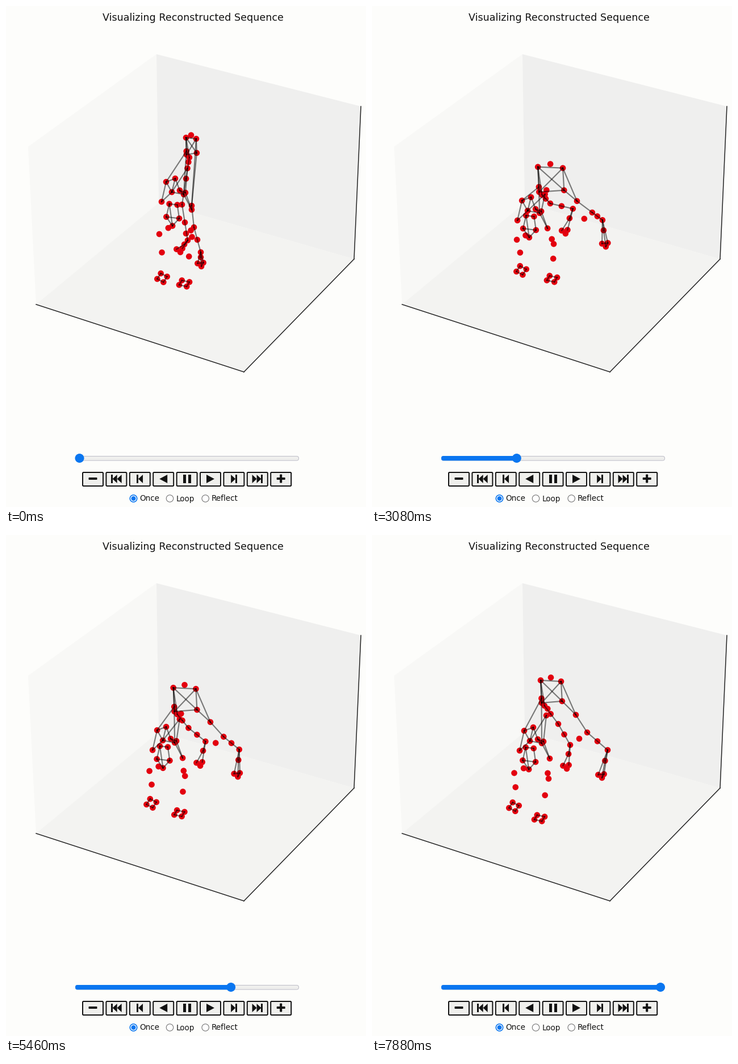
Write a matplotlib script that moves like this. It is 634 px wide and 883 px high and loops after 8350 ms.

```python
import numpy as np
import matplotlib.pyplot as plt
from matplotlib.animation import FuncAnimation
from matplotlib.collections import EllipseCollection, LineCollection
from matplotlib.patches import Circle, FancyBboxPatch, Polygon, Rectangle

W, H, DPI = 634, 883, 100
LOOP, STEP = 8350, 25
PX = 72 / DPI  # points per pixel

PAPER, INK, BLUE, RED = "#fdfdfb", "#121212", "#0a76f0", "#e3000f"

plt.rcParams["font.family"] = "DejaVu Sans"
fig = plt.figure(figsize=(W / DPI, H / DPI), dpi=DPI, facecolor=PAPER)
ax = fig.add_axes([0, 0, 1, 1])
ax.set_xlim(0, W)
ax.set_ylim(H, 0)
ax.axis("off")


# ---- fixed scenery -------------------------------------------------------

def poly(points, color, z=1):
    ax.add_patch(Polygon(points, closed=True, fc=color, ec="none", zorder=z))


def rect(x, y, w, h, color, z=3):
    ax.add_patch(Rectangle((x, y), w, h, fc=color, ec="none", zorder=z))


def pill(x, y, w, h, r, face, edge="none", lw=0.0, z=2):
    box = FancyBboxPatch((x, y), w, h, boxstyle=f"round,pad=0,rounding_size={r}",
                         fc=face, ec=edge, lw=lw * PX, zorder=z)
    ax.add_patch(box)
    return box


def label(x, y, text, size, ha="left"):
    ax.text(x, y, text, fontsize=size * PX, ha=ha, va="baseline", color=INK)


def draw_room():
    top, back = (265, 85), (269, 347)
    left, front, right = (53, 526), (419, 645), (613, 446)
    poly([(39, 248), top, back, left], "#f8f8f6")
    poly([top, (625, 177), right, back], "#efefee")
    poly([left, back, right, front], "#f3f3f1")
    for a, b in ((left, front), (front, right), (right, (625, 177))):
        ax.plot(*zip(a, b), color="#222222", lw=1.5 * PX, zorder=2)


def triangle(base, tip, y=833.5, half=7.5):
    poly([(base, y - half), (tip, y), (base, y + half)], INK, 3)


def skip(cx, way, count):
    """Bar with one or two triangles pointing towards it."""
    size = 8
    half = (count * size + 2.5) / 2
    for k in range(count):
        base = cx - way * (half - k * size)
        triangle(base, base + way * size)
    bar = cx + way * (half - 1.25)
    rect(bar - 1.5, 826, 3, 15, INK)


def draw_buttons():
    centres = [153 + 41.4 * k for k in range(9)]
    for cx in centres:
        pill(cx - 18, 822, 36, 24, 1.5, "#efefec", INK, 2)
    minus, first, prev, rev, pause, play, nxt, last, plus = centres
    for cx in (minus, plus):
        pill(cx - 7.5, 831, 15, 4, 1, INK, z=3)
    pill(plus - 2, 825.5, 4, 15, 1, INK, z=3)
    skip(first, -1, 2)
    skip(prev, -1, 1)
    skip(nxt, 1, 1)
    skip(last, 1, 2)
    triangle(rev + 7, rev - 7)
    triangle(play - 7, play + 7)
    for dx in (-7, 2):
        rect(pause + dx, 826, 5.5, 14.5, INK)


def draw_radios():
    for cx, text, on in ((224.5, "Once", True), (288.5, "Loop", False),
                         (351.2, "Reflect", False)):
        edge = BLUE if on else "#767676"
        ax.add_patch(Circle((cx, 868), 6.2, fc="white", ec=edge,
                            lw=(1.6 if on else 1.1) * PX, zorder=3))
        if on:
            ax.add_patch(Circle((cx, 868), 4, fc=BLUE, ec="none", zorder=4))
        label(cx + 10.7, 872.5, text, 13.5)


draw_room()
label(329.5, 26.5, "Visualizing Reconstructed Sequence", 17.5, "center")
pill(122.5, 793.5, 393, 7.5, 3.7, "#efefed", "#bdbdc8", 1)
draw_buttons()
draw_radios()


# ---- body rig ------------------------------------------------------------

# Joint paths: standing, stepping out, walking, crouching, rising again.
KEYS = [970, 1170, 2150, 3080, 6170]
PATHS = {
    "chest": [(326, 247), (329, 240), (331, 247), (314, 306), (315, 276)],
    "hips": [(301, 325), (301, 345), (303, 338), (283, 358), (287, 360)],
    "left shoulder": [(327, 352), (358, 288), (362, 305), (361, 344), (359, 317)],
    "left elbow": [(331, 390), (354, 354), (355, 357), (388, 364), (379, 348)],
    "left wrist": [(343, 434), (374, 453), (381, 429), (406, 377), (415, 379)],
    "left palm": [(343, 455), (351, 479), (359, 462), (411, 420), (404, 424)],
    "right elbow": [(310, 350), (299, 349), (299, 352), (314, 348), (328, 333)],
    "right wrist": [(320, 413), (311, 425), (319, 413), (354, 357), (349, 370)],
    "right palm": [(306, 430), (288, 433), (301, 434), (340, 397), (342, 408)],
    "left foot": [(275, 479), (272, 449), (273, 457), (263, 466), (250, 479)],
    "right foot": [(314, 489), (324, 467), (315, 472), (317, 481), (295, 499)],
}
CHEST_WIDTH = [9, 14, 16, 22, 18]  # half width as the body turns

# Hip markers relative to the hip centre: back arc, then the front row.
HIP_SHAPE = [(-3, -21), (-19, -15), (-27, 20), (-9, 3),
             (5, 0), (12, 7), (15, 4), (26, 34)]

BONES = """
chest0-chest1 chest1-chest2 chest2-chest3 chest3-chest0 chest0-chest2
chest1-chest3 chest0-rib rib-hip1 rib-hip5
chest1-left0 chest2-left0 left0-left1 left1-left3
chest0-right0 right0-right1 right1-right2 right2-right4
left3-left4 right4-right5 right5-right6 right4-right7
left3-left5 left3-left6 left4-left7 left5-left6 left6-left7
spine-hip3 spine-hip6 hip0-hip1 hip0-hip3 hip1-hip3 hip1-hip2 hip2-hip3
hip3-hip5 hip0-hip4 hip4-hip5 hip4-hip6 hip5-hip7 hip6-hip7
thigh0-thigh1 thigh1-thigh2 thigh2-thigh3 thigh3-thigh4 thigh4-thigh0
thigh0-thigh3 thigh2-thigh4
lfoot0-lfoot1 lfoot1-lfoot2 lfoot2-lfoot3 lfoot3-lfoot0
rfoot0-rfoot1 rfoot1-rfoot2 rfoot2-rfoot3 rfoot3-rfoot0
"""


def mix(a, b, u):
    return a + (b - a) * u


def shift(p, x, y=0):
    return p + np.array([x, y])


def ring(centre, n, rx, ry, start):
    a = np.radians(start) + np.arange(n) * 2 * np.pi / n
    return [shift(centre, rx * np.cos(t), ry * np.sin(t)) for t in a]


def along(path, t):
    """Value on a key path; the last stretch eases in slowly."""
    k = int(np.clip(np.searchsorted(KEYS, t, "right") - 1, 0, len(KEYS) - 2))
    u = np.clip((t - KEYS[k]) / (KEYS[k + 1] - KEYS[k]), 0, 1)
    if k == len(KEYS) - 2:
        u = u ** 2.4
    a, b = np.array(path[k:k + 2], float)
    return mix(a, b, u)


def chest_box(c, w):
    h = 0.55 * w + 10
    corners = [(-w, -h), (w, 2 - h), (1.1 * w, h - 3), (-0.9 * w, h)]
    return [shift(c, *p) for p in corners]


def forearm(elbow, wrist, palm):
    """Elbow, forearm marker, wrist, knuckle and three fingers."""
    return [mix(elbow, wrist, 0.5), wrist, mix(wrist, palm, 0.42),
            *ring(palm, 3, 6, 4, 200)]


def leg(hips, foot, knees, shin):
    return [shift(mix(hips, foot, 0.43), knees[0]),
            shift(mix(hips, foot, 0.5), knees[1]),
            shift(mix(hips, foot, 0.71), shin)]


def markers(t):
    j = {name: along(path, t) for name, path in PATHS.items()}
    chest, hips = j["chest"], j["hips"]
    width = along(CHEST_WIDTH, t)
    box = chest_box(chest, width)
    spine = shift(mix(chest, hips, 0.5), 6)
    shoulder = shift(box[3], 5, 5)

    left = [j["left shoulder"], j["left elbow"],
            *forearm(j["left elbow"], j["left wrist"], j["left palm"])]
    right = [shoulder, mix(shoulder, j["right elbow"], 0.45), j["right elbow"],
             *forearm(j["right elbow"], j["right wrist"], j["right palm"])]
    return {
        "chest": box,
        "neck": [shift(chest, 0, -0.6 * width - 14)],
        "rib": [mix(box[0], box[3], 0.8)],
        "spine": [spine],
        "back": [mix(spine, chest, 0.28)],
        "left": left,
        "side": [shift(j["left elbow"], -14, 11)],
        "right": right,
        "hip": [shift(hips, *p) for p in HIP_SHAPE],
        "thigh": ring(mix(hips, j["left foot"], 0.27), 5, 12, 21, -122),
        "lleg": leg(hips, j["left foot"], (-4, -18), -8),
        "rleg": leg(hips, j["right foot"], (19, 20), 12),
        "lfoot": ring(j["left foot"], 4, 9, 8, -105),
        "rfoot": ring(j["right foot"], 4, 10, 6, -115),
    }


def name_index(groups):
    index, k = {}, 0
    for name, points in groups.items():
        for i in range(len(points)):
            index[name if len(points) == 1 else f"{name}{i}"] = k
            k += 1
    return index


index = name_index(markers(0))
bones = np.array([[index[n] for n in b.split("-")] for b in BONES.split()])


def pose(t):
    return np.array([p for group in markers(t).values() for p in group])


# ---- moving artists ------------------------------------------------------

KNOB_START, KNOB_END = 129.5, 508
PLAY_FROM, PLAY_TO = 970, 7330

first_pose = pose(0)
size = np.full(len(first_pose), 10.6)
dots = EllipseCollection(size, size, 0 * size, units="xy", offsets=first_pose,
                         offset_transform=ax.transData,
                         facecolors=RED, edgecolors="none", zorder=5)
ax.add_collection(dots, autolim=False)
lines = LineCollection(first_pose[bones], colors=[(0, 0, 0, 0.5)],
                       linewidths=2.1 * PX, capstyle="projecting", zorder=6)
ax.add_collection(lines, autolim=False)
fill = pill(122, 793, 8, 8.3, 3.7, BLUE, z=3)
knob = Circle((KNOB_START, 797), 8, fc=BLUE, ec="none", zorder=4)
ax.add_patch(knob)


def draw(i):
    t = i * STEP
    points = pose(t)
    dots.set_offsets(points)
    lines.set_segments(points[bones])
    x = np.interp(t, [PLAY_FROM, PLAY_TO], [KNOB_START, KNOB_END])
    knob.center = (x, 797)
    fill.set_width(x - 122)
    return dots, lines, fill, knob


anim = FuncAnimation(fig, draw, frames=LOOP // STEP, interval=STEP,
                     init_func=lambda: draw(0), repeat=True, repeat_delay=0)
plt.show()
```
